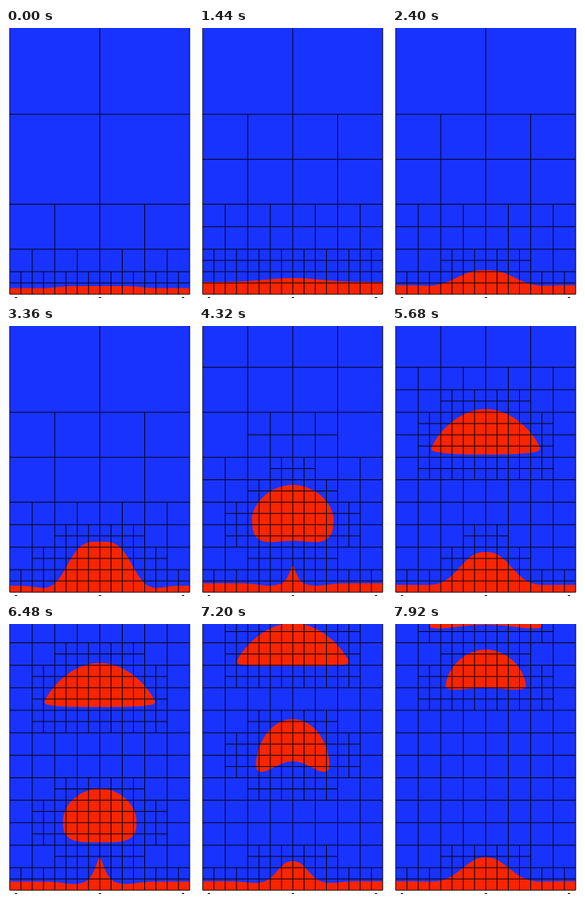
These frames come from a looping animation (234 px wide and 338 px high, 8000 ms). A matplotlib script:

```python
import numpy as np
import matplotlib.pyplot as plt
from matplotlib.animation import FuncAnimation
from matplotlib.collections import LineCollection
from matplotlib.patches import Polygon, Rectangle
from matplotlib.path import Path

W, H, DPI = 234, 338, 100
FRAMES, INTERVAL = 100, 80
BLUE, RED = "#1933ff", "#f72500"
ROWS, COLS, CELL = 12, 8, 28.15
LEFT, BOTTOM = 4.7, 333.2
RIGHT, TOP = LEFT + COLS * CELL, BOTTOM - ROWS * CELL
CENTER = (LEFT + RIGHT) / 2

# Film states: base level, bump height, bump width, steepness, trough depth
HUMP = (325, 55, 44, 3.6, 3)
NECK = (322.5, 32, 9, 1.5, 3)
SPIKE = (322, 23, 6.5, 1.4, 3)
FILM = {0: (325.6, 2.6, 56, 6, 0), 1.44: (318, 5, 48, 2, 0), 2.4: (322, 19, 42, 2.6, 1),
        3.36: HUMP, 4.04: NECK, 4.32: SPIKE, 4.75: (322.5, 17, 22, 2.2, 1.5),
        5.68: (324, 41, 39, 2.6, 0.5),
        5.95: HUMP, 6.44: NECK, 6.7: SPIKE, 7.2: (322, 25, 23, 2.6, 2),
        7.92: (322, 30, 36, 2.3, 1)}

# Bubble states: top, level of the widest part, half width, depth below it, dent.
# Each starts hidden inside the hump and rises out of it.
SEED = (274, 300, 34, 15, 0)
BUBBLES = [
    {3.36: SEED, 4.04: (220, 257, 49, 33, 4), 4.32: (199, 240, 51, 40, 11),
     5.68: (104, 153, 68, 8, 0), 7.2: (-1, 47, 70, 7, 1.5), 7.92: (-50, 2, 70.5, 6, 7)},
    {5.95: SEED, 6.44: (211, 250, 46, 33, 4), 7.2: (119, 176, 46, 15.5, 19.5),
     7.92: (32, 77, 50, 8, 5)},
]


def state(keys, t):
    return [np.interp(t, list(keys), column) for column in zip(*keys.values())]


def film_curve(t):
    base, height, width, steep, trough = state(FILM, t)
    x = np.linspace(LEFT, RIGHT, 451)
    d = abs(x - CENTER)
    y = base - height * np.exp(-(d / width)**steep)
    y += trough * np.exp(-((d - width - 24) / 18)**2)
    return np.c_[x, y]


def bubble_curve(keys, t, dented=True):
    top, rim, width, depth, dent = state(keys, t)
    angle = np.linspace(0, 2 * np.pi, 240, endpoint=False)
    u, c = np.sin(angle), np.cos(angle)
    cap = rim - (rim - top) * abs(c)**(width / 42)
    belly = rim + depth * abs(c)**0.6 - dented * dent * c**4
    return np.c_[CENTER + width * u, np.where(c > 0, cap, belly)]


def shapes_at(t, dented=True):
    """Film curve, and every red area as a closed outline."""
    film = film_curve(t)
    pool = np.vstack([film, (RIGHT, BOTTOM), (LEFT, BOTTOM)])
    bubbles = [bubble_curve(b, t, dented) for b in BUBBLES if t >= min(b)]
    return film, [pool] + bubbles


ROW, COL = np.mgrid[:ROWS, :COLS]
CX, CY = LEFT + (COL + 0.5) * CELL, TOP + (ROW + 0.5) * CELL


def near_interface(t):
    """Cells to refine: close to the interface, with a wider band inside."""
    film, areas = shapes_at(t, dented=False)
    pts = np.vstack([film] + areas[1:])
    dx = np.maximum(abs(CX[..., None] - pts[:, 0]) - CELL / 2, 0)
    dy = np.maximum(abs(CY[..., None] - pts[:, 1]) - CELL / 2, 0)
    centers = np.c_[CX.ravel(), CY.ravel()]
    inside = np.any([Path(a).contains_points(centers) for a in areas], axis=0)
    reach = 13.5 if t < 2.4 else 6.8
    outer = ((dx / 12)**2 + (dy / reach)**2 < 1).any(-1)
    inner = (np.hypot(dx, dy) < 15).any(-1) & inside.reshape(ROWS, COLS)
    return outer | inner


def grow(mask):
    """Add all eight neighbours."""
    p = np.pad(mask, 1)
    r, c = mask.shape
    return np.any([p[i:i + r, j:j + c] for i in range(3) for j in range(3)], axis=0)


def coarsen(mask):
    r, c = mask.shape
    return mask.reshape(r // 2, 2, c // 2, 2).any(axis=(1, 3))


def cross_lines(mask, size):
    """Lines that split each marked square into four."""
    lines = []
    for r, c in np.argwhere(mask):
        x, y = LEFT + c * size, TOP + r * size
        half = size / 2
        lines += [[(x, y + half), (x + size, y + half)],
                  [(x + half, y), (x + half, y + size)]]
    return lines


def build_meshes():
    """Neighbours differ by one level at most; medium cells stay split."""
    meshes, medium = [], np.zeros((ROWS // 2, COLS // 2), bool)
    for i in range(FRAMES):
        fine = near_interface(i * INTERVAL / 1000)
        medium = medium | coarsen(grow(fine))
        coarse = coarsen(grow(medium))
        meshes.append(cross_lines(fine, CELL) + cross_lines(medium, 2 * CELL)
                      + cross_lines(coarse, 4 * CELL))
    return meshes


MESHES = build_meshes()
ROOT_LINES = [[(x, TOP), (x, BOTTOM)] for x in (LEFT, CENTER, RIGHT)]
ROOT_LINES += [[(LEFT, y), (RIGHT, y)] for y in TOP + 4 * CELL * np.arange(1, 4)]

fig = plt.figure(figsize=(W / DPI, H / DPI), dpi=DPI, facecolor="white")
ax = fig.add_axes([0, 0, 1, 1])
ax.set(xlim=(0, W), ylim=(H, 0))
ax.axis("off")
ax.add_patch(Rectangle((LEFT, TOP), RIGHT - LEFT, BOTTOM - TOP, fc=BLUE, ec="none"))
patches = [ax.add_patch(Polygon(np.zeros((3, 2)), fc=RED, ec="none"))
           for _ in range(1 + len(BUBBLES))]
style = dict(colors="black", linewidths=0.9 * 72 / DPI, snap=False)
mesh = ax.add_collection(LineCollection([], **style))
ax.add_collection(LineCollection(ROOT_LINES, **style))
# Tips of the cropped axis labels
for x in (11, 116, 220):
    ax.add_patch(Rectangle((x, 337), 3, 1, fc="black", ec="none"))


def update(i):
    _, areas = shapes_at(i * INTERVAL / 1000)
    for k, patch in enumerate(patches):
        patch.set_visible(k < len(areas))
        if k < len(areas):
            patch.set_xy(areas[k])
    mesh.set_segments(MESHES[i])
    return patches + [mesh]


anim = FuncAnimation(fig, update, frames=FRAMES, interval=INTERVAL, repeat=True,
                     repeat_delay=0)
plt.show()
```
